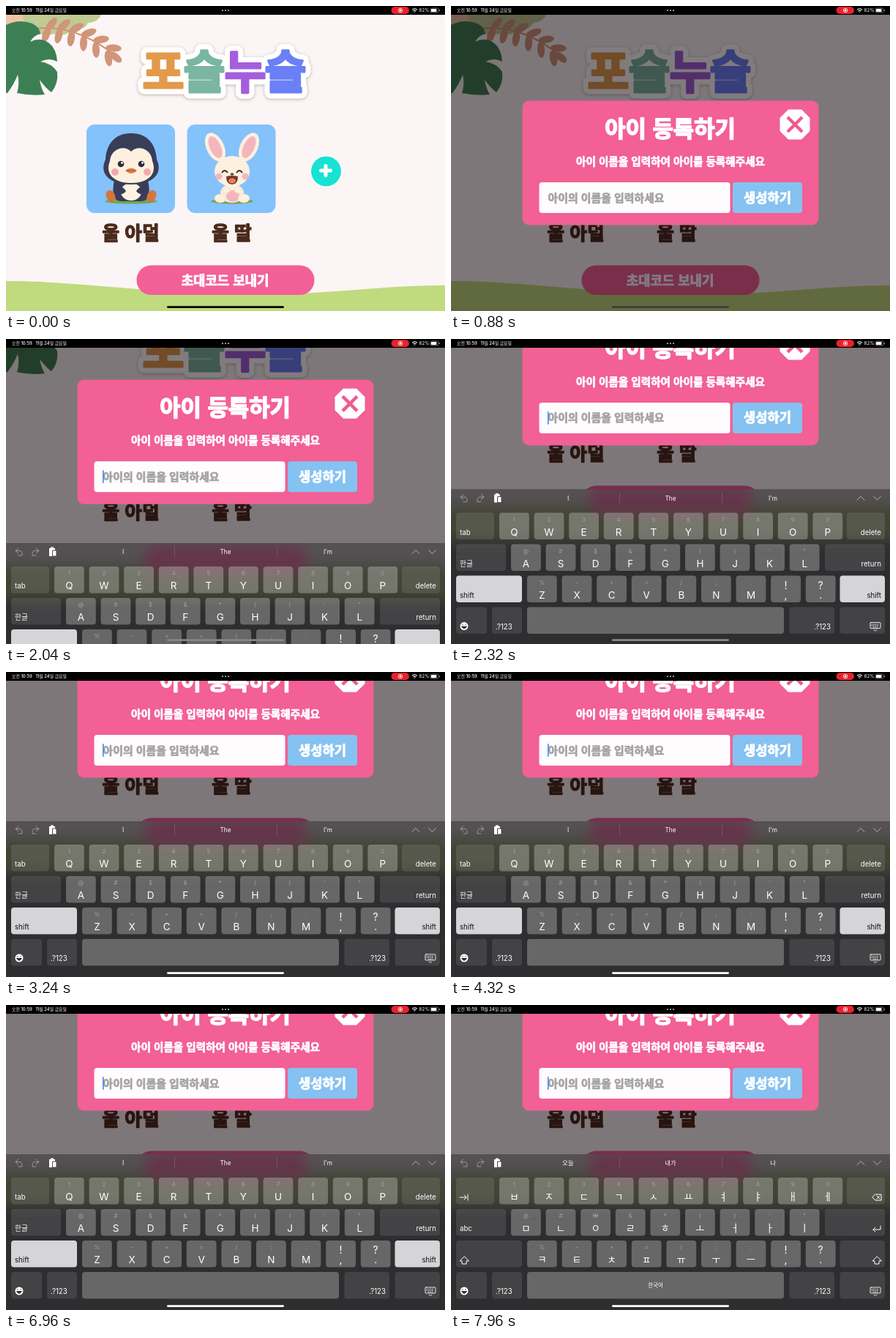
Recreate the animation shown at these times as an HTML page. Size 600x417 px, loop 8 s.

```html
<!DOCTYPE html>
<html lang="ko">
<head>
<meta charset="utf-8">
<style>
  html, body { margin: 0; width: 100%; height: 100%; overflow: hidden; background: #000; }
  svg { display: block; width: 100%; height: 100%; }
  text { font-family: Inter, "Noto Sans CJK KR", "Noto Sans CJK", sans-serif; fill: #fff; white-space: pre; }
  .chunky text {
    font-family: "Noto Sans CJK KR", "Noto Sans CJK", sans-serif; font-weight: 900;
    fill: var(--ink, #fff); stroke: var(--ink, #fff); stroke-width: .05em; stroke-linejoin: round;
  }
  .mid { text-anchor: middle; }
  .end { text-anchor: end; }
  .line { fill: none; stroke: #fff; stroke-linecap: round; stroke-linejoin: round; }
</style>
</head>
<body>
<svg viewBox="0 0 600 417">
  <defs>
    <filter id="shadow" x="-20%" y="-30%" width="140%" height="160%">
      <feDropShadow dx="0" dy="1" stdDeviation="2" flood-color="#655" flood-opacity=".45"/>
    </filter>
    <filter id="blur" filterUnits="userSpaceOnUse" x="-60" y="100" width="720" height="400">
      <feGaussianBlur stdDeviation="9"/>
    </filter>
    <clipPath id="panel"><rect y="204" width="600" height="213"/></clipPath>
  </defs>

  <g id="page" class="chunky">
    <rect width="600" height="600" fill="#fbf5f5"/>
    <g id="plants"></g>
    <path d="M0 376C60 376 115 382 179 387C260 394 350 396 421 392C485 388 540 382 600 382V600H0Z" fill="#c0da7e"/>
    <g id="logo"></g>
    <rect x="110" y="162" width="121" height="121" rx="11" fill="#84c2fb"/>
    <rect x="247.500" y="162" width="121" height="121" rx="11" fill="#84c2fb"/>

    <g id="penguin">
      <ellipse cx="171" cy="267" rx="36" ry="3.500" fill="#74a651"/>
      <path d="M148 238Q142 267 158 267H184Q200 267 194 238Z" fill="#3a3d58"/>
      <ellipse cx="171" cy="254" rx="14" ry="12" fill="#fdf3e4"/>
      <path d="M148 246Q160 245 164 253Q160 259 150 257ZM194 246Q182 245 178 253Q182 259 192 257Z" fill="#3a3d58"/>
      <path d="M171 174C194 174 205 190 206 210C215 228 202 244 171 244C140 244 127 228 136 210C137 190 148 174 171 174Z" fill="#3a3d58"/>
      <path d="M171 199C180 189 199 195 200 212C207 229 195 242 171 242C147 242 135 229 142 212C143 195 162 189 171 199Z" fill="#fdf0df"/>
      <g fill="#f5a9ae"><circle cx="149" cy="227" r="5"/><circle cx="193" cy="227" r="5"/></g>
      <g fill="#2b2c3c"><circle cx="157" cy="216" r="4.300"/><circle cx="185" cy="216" r="4.300"/></g>
      <g fill="#fff"><circle cx="158.500" cy="214.500" r="1.400"/><circle cx="186.500" cy="214.500" r="1.400"/></g>
      <path d="M163 225Q171 218 179 225Q171 233 163 225Z" fill="#df8545"/>
      <path d="M164 225H178" stroke="#9c4e2a"/>
      <g fill="#d87539">
        <ellipse cx="143" cy="260" rx="6" ry="8.500" transform="rotate(-24 143 260)"/>
        <ellipse cx="199" cy="260" rx="6" ry="8.500" transform="rotate(24 199 260)"/>
      </g>
    </g>

    <g id="rabbit">
      <ellipse cx="309" cy="267" rx="29" ry="3.500" fill="#74a651"/>
      <g fill="#fdf0df">
        <ellipse cx="286" cy="193" rx="12" ry="21" transform="rotate(-25 286 193)"/>
        <ellipse cx="332" cy="193" rx="12" ry="21" transform="rotate(25 332 193)"/>
        <ellipse cx="309" cy="256" rx="16" ry="13"/>
        <ellipse cx="309" cy="226" rx="24" ry="21"/>
      </g>
      <g fill="#f6b5bd">
        <ellipse cx="286" cy="193" rx="7.500" ry="16" transform="rotate(-25 286 193)"/>
        <ellipse cx="332" cy="193" rx="7.500" ry="16" transform="rotate(25 332 193)"/>
        <circle cx="291" cy="233" r="4.500"/><circle cx="327" cy="233" r="4.500"/>
        <ellipse cx="310" cy="260" rx="9" ry="8"/>
      </g>
      <path d="M295 228Q299 222 303 228M315 228Q319 222 323 228" fill="none" stroke="#43302d" stroke-width="2"/>
      <path d="M301 233Q309 231 317 233Q317 244 309 244Q301 244 301 233Z" fill="#74362e"/>
      <ellipse cx="309" cy="239" rx="5" ry="3.500" fill="#e78648"/>
      <ellipse cx="309" cy="230" rx="2.500" ry="1.700" fill="#6b4640"/>
      <g fill="#fdf0df" stroke="#e6cfbd" stroke-width=".6">
        <ellipse cx="293" cy="263" rx="8" ry="6"/><ellipse cx="325" cy="263" rx="8" ry="6"/>
        <ellipse cx="301" cy="252" rx="5" ry="4"/><ellipse cx="317" cy="252" rx="5" ry="4"/>
      </g>
    </g>

    <g class="mid" font-size="25.700" style="--ink:#4b2a1c">
      <text x="170.500" y="320">울 아덜</text>
      <text x="308.500" y="320">울 딸</text>
    </g>
    <circle cx="437.500" cy="226" r="22.500" fill="#fff"/>
    <circle cx="437.500" cy="226" r="20.500" fill="#18e2d2"/>
    <path d="M437 218.500V231.500M430.500 225H443.500" class="line" stroke-width="5"/>
    <rect x="178.500" y="354.500" width="243" height="40.500" rx="20" fill="#f26097"/>
    <text x="299.500" y="381.500" class="mid" font-size="17.800">초대코드 보내기</text>

    <g id="dialog">
      <rect y="-10" width="600" height="620" fill="#080004" opacity=".514"/>
      <rect x="97.500" y="129.500" width="405" height="170" rx="9" fill="#f26095"/>
      <text x="299.500" y="178.500" class="mid" font-size="30.800">아이 등록하기</text>
      <path d="M461 141.500H479L490.500 153V171L479 182.500H461L449.500 171V153Z" fill="#fff"/>
      <path d="M460 152L480 172M480 152L460 172" stroke="#ee5b90" stroke-width="4.500"/>
      <text x="300" y="218" class="mid" font-size="14.600">아이 이름을 입력하여 아이를 등록해주세요</text>
      <rect x="120.500" y="241" width="261" height="42" rx="4" fill="#fefcfd"/>
      <text x="132.500" y="267.500" font-size="14.900" style="--ink:#a5a3a4">아이의 이름을 입력하세요</text>
      <rect id="caret" x="132" y="253" width="1.600" height="18" rx=".8" fill="#4288ee"/>
      <rect x="385" y="241" width="95" height="42" rx="4" fill="#85c2f1"/>
      <text x="432.500" y="268.500" class="mid" font-size="17.700">생성하기</text>
    </g>
  </g>

  <g id="keyboard" clip-path="url(#panel)">
    <rect y="204" width="600" height="213" fill="#2e2e30"/>
    <g id="backdrop" filter="url(#blur)">
      <rect x="-50" y="150" width="700" height="232" fill="#555153"/>
      <rect x="-50" y="382" width="700" height="48" fill="#434534"/>
      <rect x="188" y="355" width="224" height="38" rx="18" fill="#65344c"/>
    </g>
    <g id="toolbar">
      <path d="M230.500 208V224M370.500 208V224" stroke="#fff" stroke-opacity=".13"/>
      <path d="M17 211L13 214.500L17 218M13.500 214.500H19Q22.500 215 22 221H17M41 211L45 214.500L41 218M44.500 214.500H39Q35.500 215 36 221H41" class="line" stroke-opacity=".4"/>
      <path d="M59 211H67V222H59Z" fill="#fff"/><path d="M61 209.500H65V212H61Z" fill="#fff"/>
      <path d="M63.500 214H69V222H63.500Z" fill="#fff" stroke="#49474a"/>
      <path d="M555 218.500L560 213.500L565 218.500M577.500 213.500L582.500 218.500L587.500 213.500" class="line" stroke-opacity=".55"/>
    </g>
    <g id="keys"></g>
  </g>

  <rect id="home" x="220" y="410.300" width="160" height="2.600" rx="1.300"/>
  <g id="status">
    <rect width="600" height="12"/>
    <text x="8" y="8.200" font-size="5.900" font-weight="500">오전 10:59   11월 24일 금요일</text>
    <g fill="#bbb"><circle cx="296" cy="6" r="1.100"/><circle cx="300" cy="6" r="1.100"/><circle cx="304" cy="6" r="1.100"/></g>
    <rect x="526.500" y="1" width="24.500" height="10" rx="5" fill="#e8212e"/>
    <circle cx="539" cy="6" r="2.800" fill="none" stroke="#fff" stroke-width=".8"/><circle cx="539" cy="6" r="1.400" fill="#fff"/>
    <path d="M555.500 5Q558.500 2.500 561.500 5M557 6.700Q558.500 5.500 560 6.700M558.500 8.200V8.300" class="line" stroke-width="1.100"/>
    <text x="564.500" y="8.300" font-size="6.300">82%</text>
    <rect x="580" y="3" width="11" height="6" rx="1.700" fill="none" stroke="#999" stroke-width=".7"/>
    <rect x="581" y="4" width="7.500" height="4" rx=".8" fill="#fff"/><path d="M592.500 5V7" stroke="#999"/>
  </g>
</svg>

<script>
const LOOP = 8000;
const $ = id => document.getElementById(id);
const clamp = v => Math.max(0, Math.min(1, v));
const escapeText = s => s.replace(/&/g, "&amp;").replace(/</g, "&lt;");
const label = (s, x, y, size, cls = "mid", style = "") =>
  `<text x="${x}" y="${y}" font-size="${size}" class="${cls}" style="${style}">${escapeText(s)}</text>`;

// Title lettering: one soft white outline behind the coloured letters
const letters = [["포", 215, "#e39a4c"], ["슬", 271, "#7ab6a2"], ["누", 327, "#a45edb"], ["슬", 382, "#6b80f6"]];
const lettering = outline => letters.map(([ch, x, color]) =>
  label(ch, x, 113, 62, "mid", outline ? "stroke-width:17px" : `--ink:${color}`)).join("");
$("logo").innerHTML = `<g filter="url(#shadow)">${lettering(true)}</g>${lettering(false)}`;

// Foliage in the top left corner
const leaf = (x, y, rx, ry, angle, color) =>
  `<ellipse cx="${x}" cy="${y}" rx="${rx}" ry="${ry}" transform="rotate(${angle} ${x} ${y})" fill="${color}"/>`;
let plants = `<path d="M0 12H50Q44 26 26 27Q12 36 0 32Z" fill="#efc6a5"/>
  <path d="M22 12H130Q126 22 112 23Q108 33 92 32Q84 42 66 38Q46 44 36 30Q24 26 22 12Z" fill="#bfcb92"/>
  <path d="M40 31Q96 24 152 70" fill="none" stroke="#cf926f" stroke-width="2"/>`;
for (let i = 0; i < 6; i++) {
  const x = 58 + i * 17, y = 31 + i * i * 1.3;
  plants += leaf(x + 4, y - 6, 11, 5, -52 + i * 11, "#d1957a") + leaf(x - 3, y + 8, 11, 5, 110 - i * 6, "#d1957a");
}
plants += leaf(150, 70, 10, 5, 40, "#d1957a") +
  `<path d="M0 26Q18 17 36 24Q46 29 47 38Q38 40 33 49Q46 42 58 50Q69 58 70 76Q59 70 47 76Q62 78 70 90Q72 106 62 118
    Q54 112 46 101Q48 113 53 121Q34 123 15 119Q19 106 16 94Q11 107 2 119L0 119Z" fill="#3d7f55"/>`;
$("plants").innerHTML = plants;

const layouts = {
  english: {
    main: ["QWERTYUIOP", "ASDFGHJKL", "ZXCVBNM"], sub: ["1234567890", "@#$&*()'\"", "%-+=/;:"],
    left: ["tab", "한글", "shift"], right: ["delete", "return", "shift"],
    mode: ".?123", hints: ["I", "The", "I'm"], space: ""
  },
  symbols: {
    main: ["1234567890", "@#$&*()’”", "%-+=/;:"], sub: ["", "€£¥_^[]{}", "§|~…\\<>"],
    left: ["tab", "undo", "#+="], right: ["delete", "return", "#+="],
    mode: "ABC", hints: ["I", "The", "I'm"], space: ""
  },
  korean: {
    main: ["ㅂㅈㄷㄱㅅㅛㅕㅑㅐㅔ", "ㅁㄴㅇㄹㅎㅗㅓㅏㅣ", "ㅋㅌㅊㅍㅠㅜㅡ"], sub: ["1234567890", "@#₩&*()'\"", "%-+=/;:"],
    left: ["⇥", "abc", "⇧"], right: ["⌫", "⏎", "⇧"],
    mode: ".?123", hints: ["오늘", "내가", "나"], space: "한국어"
  }
};
const icons = {
  "⇥": "M0 -4H9M6 -7L9 -4L6 -1M11 -8V0",
  "⇧": "M6 -9L0 -3H3V1H9V-3H12Z",
  "⌫": "M4 -8H12V0H4L0 -4ZM6 -6L10 -2M10 -6L6 -2",
  "⏎": "M11 -8V-3H1M4 -6L1 -3L4 0"
};
// x of the first letter, left key width, x of the right key
const rows = [[66, 52, 541], [82, 68, 511], [104, 90, 531.5]];
const rowTop = r => 236 + r * 43;
const key = (x, y, w, fill) => `<rect x="${x}" y="${y}" width="${w}" height="36.500" rx="4" fill="${fill}"/>`;
const LIGHT = "rgba(255,255,255,.27)", DARK = "rgba(255,255,255,.1)", ACTIVE = "#d5d4d7";

function sideKey(text, x, y, w, right) {
  const active = text === "shift";
  const box = key(x, y, w, active ? ACTIVE : DARK);
  const tx = right ? x + w - 5 : x + 5;
  if (icons[text])
    return box + `<path d="${icons[text]}" transform="translate(${right ? tx - 12 : tx} ${y + 31})" class="line"/>`;
  const color = active ? "#111" : text === "undo" ? "#777" : "#fff";
  return box + label(text, tx, y + 30, 9.7, right ? "end" : "", `fill:${color}`);
}

function buildLayout(layout) {
  let out = layout.hints.map((hint, i) => label(hint, 160 + i * 140, 219, 8.3)).join("");
  rows.forEach(([start, leftWidth, rightX], r) => {
    const y = rowTop(r);
    out += sideKey(layout.left[r], 7, y, leftWidth, false) + sideKey(layout.right[r], rightX, y, 593 - rightX, true);
    const chars = [...layout.main[r], ...(r === 2 ? ",." : "")];
    chars.forEach((ch, i) => {
      const x = start + i * 47.6, cx = x + 20.4;
      const pair = { ",": "!", ".": "?" }[ch];
      const sub = [...layout.sub[r]][i];
      out += key(x, y, 40.8, LIGHT);
      if (pair) out += label(pair, cx, y + 18, 14) + label(ch, cx, y + 31, 14);
      else if (!sub) out += label(ch, cx, y + 24, 15);
      else out += label(sub, cx, y + 12, 8, "mid", "fill:#a1a1a1") + label(ch, cx, y + 31, 13.5);
    });
  });
  const y = 365;
  out += key(7, y, 42, DARK) + sideKey(layout.mode, 56, y, 41, false) + key(104, y, 351, LIGHT) +
    sideKey(layout.mode, 462.5, y, 61.5, true) + key(531.5, y, 61.5, DARK) + label(layout.space, 279.5, 386, 7.5);
  out += `<circle cx="18" cy="391" r="5.500" fill="#fff"/>
    <path d="M14.500 391.500H21.500Q18 397 14.500 391.500M16 388V389.500M20 388V389.500" fill="#333" stroke="#333"/>
    <rect x="573" y="386" width="14" height="8" rx="1" class="line" stroke-width=".9"/>
    <path d="M575 388.500H585M575 390.500H585M577 392.500H583" class="line" stroke-width=".8" stroke-dasharray="1 1.5"/>
    <path d="M578 396L580 397.500L582 396" class="line" stroke-width=".8"/>`;
  return out;
}
$("keys").innerHTML = Object.entries(layouts)
  .map(([name, layout]) => `<g id="${name}">${buildLayout(layout)}</g>`).join("");

// Critically damped spring running from 0 to 1
function spring(t, start, rate) {
  const x = Math.max(0, t - start) / 1000 * rate;
  return 1 - (1 + x) * Math.exp(-x);
}
const show = (id, on) => $(id).style.display = on ? "" : "none";
const move = (id, y) => $(id).setAttribute("transform", `translate(0 ${y.toFixed(2)})`);

function render(t) {
  const pageY = -155 * spring(t, 1961, 20);
  const keyboardY = 213 * (1 - spring(t, 1911, 17));
  move("page", pageY);
  move("keyboard", keyboardY);
  move("backdrop", pageY - keyboardY);
  show("dialog", t >= 880);
  show("keyboard", t > 1911);

  const current = t < 5240 ? "english" : t < 6440 ? "symbols" : t < 7280 ? "english" : "korean";
  Object.keys(layouts).forEach(name => show(name, name === current));

  const phase = (t + 420) % 1000;
  $("caret").style.opacity = t < 1880 ? 0 : clamp((350 - Math.abs(phase - 500)) / 80);

  const dimmed = t >= 880 ? 60 : 0;
  const tone = Math.round(dimmed + 75 * clamp((t - 1900) / 140) + 120 * clamp((t - 2400) / 500));
  $("home").setAttribute("fill", `rgb(${tone},${tone},${tone})`);
}

const began = performance.now();
function tick() {
  render((performance.now() - began) % LOOP);
  requestAnimationFrame(tick);
}
tick();
</script>
</body>
</html>
```
